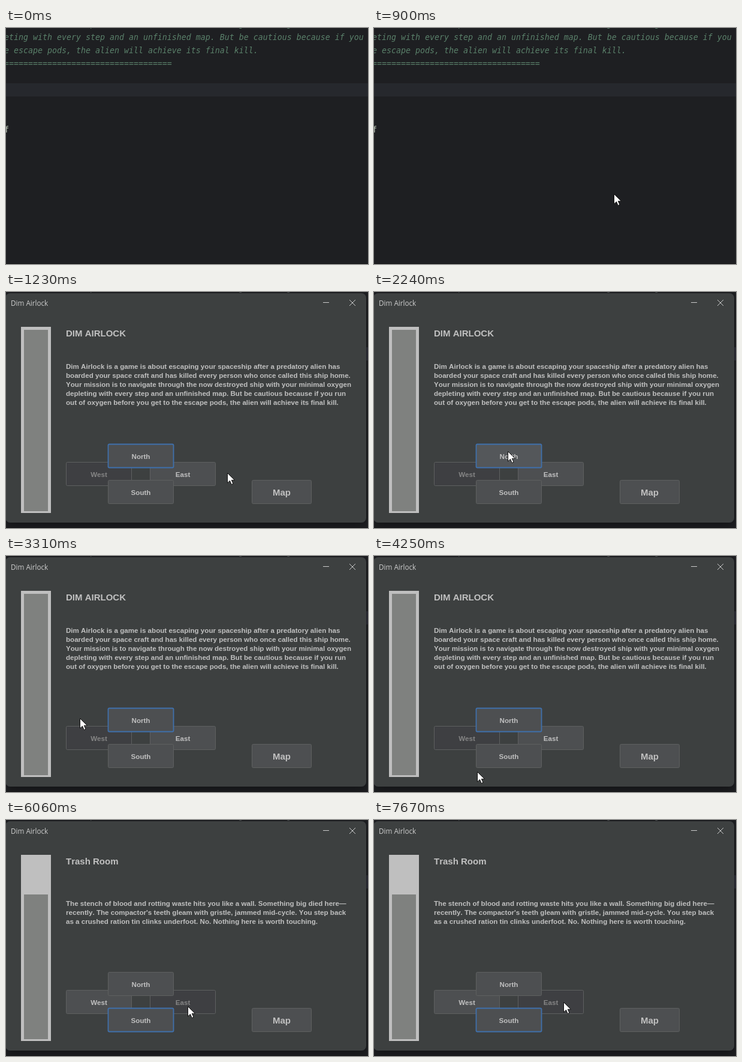
An HTML page that plays this animation: 604 px wide and 393 px high, repeating every 8 s.

```html
<!DOCTYPE html>
<html lang="en">
<head>
<meta charset="utf-8">
<title>Dim Airlock</title>
<style>
html, body { margin: 0; width: 100%; height: 100%; overflow: hidden; background: #1e1f22; }
svg { display: block; width: 604px; height: 393px; }
text { white-space: pre; font-kerning: none; }
#editor { font: 13.29px "DejaVu Sans Mono", monospace; }
#comment { fill: #5a806a; font-style: italic; }
#caret { fill: #26282d; }
.dim #comment { fill: #5c6062; }
.dim #caret { fill: #2e2e38; }
#app { font: bold 11.6px "Liberation Sans", Arial, sans-serif; fill: #c0c0c0; }
#app .title { font: 11.7px "Open Sans", sans-serif; fill: #ccc; }
#app .big { font-size: 15px; }
.icon { fill: none; stroke: #ccc; }
.btn text { text-anchor: middle; }
.btn rect { fill: #4d4f51; stroke: #5e6060; }
.btn.off rect { fill: #3e3f42; }
.btn.off text { fill: #858585; }
.btn.hover rect { fill: #54575a; stroke: #466d94; }
.btn.press rect { fill: #5c5f62; }
.btn.focus rect { stroke: #3f70ac; stroke-width: 1.8; }
</style>
</head>
<body>
<svg viewBox="0 0 604 393">
  <defs>
    <filter id="shadow" x="-10%" y="-10%" width="120%" height="120%">
      <feDropShadow dx="0" dy="4" stdDeviation="9" flood-opacity=".45"/>
    </filter>
  </defs>
  <g id="editor">
    <rect width="604" height="393" fill="#1e1f22"/>
    <rect id="caret" y="92" width="604" height="22"/>
    <rect y="392" width="604" height="1" fill="#151618"/>
    <g id="comment"></g>
    <text x="-3" y="174" fill="#bcc8b8">f</text>
  </g>
  <g id="app">
    <rect x="-1" y="2" width="602" height="382" rx="8" fill="#3c3f41" filter="url(#shadow)"/>
    <text class="title" x="8" y="23">Dim Airlock</text>
    <path class="icon" d="M529 17.5h10M573 13l10 10m0-10l-10 10"/>
    <rect x="25" y="58" width="50" height="310" fill="#bfbfbf"/>
    <rect id="oxygen" x="30" width="40" fill="#7f817f"/>
    <text id="heading" class="big" x="100" y="74"></text>
    <g id="story"></g>
    <g id="buttons"></g>
  </g>
  <path id="cursor" d="M.5.5v16.500l4-3.700 2.700 6.200 2.800-1.200-2.700-6h5.200z" fill="#fff" stroke="#111"/>
</svg>
<script>
const LOOP = 8000, OPEN = 905, PRESS = 5990, MOVE = 6060;
const $ = id => document.getElementById(id);
const textLines = (lines, x, y, step) =>
  lines.map((s, i) => `<text x="${x}" y="${y + step * i}">${s}</text>`).join('');

$('comment').innerHTML = textLines([
  'ce called this ship home. Your mission is to navigate through the now destroyed',
  'eting with every step and an unfinished map. But be cautious because if you',
  'e escape pods, the alien will achieve its final kill.',
  '='.repeat(35)
], -3, -2, 22);

const rooms = [
  { name: 'DIM AIRLOCK', top: 128, level: 63, off: 'West', focus: 'North', lines: [
    'Dim Airlock is a game is about escaping your spaceship after a predatory alien has',
    'boarded your space craft and has killed every person who once called this ship home.',
    'Your mission is to navigate through the now destroyed ship with your minimal oxygen',
    'depleting with every step and an unfinished map. But be cautious because if you run',
    'out of oxygen before you get to the escape pods, the alien will achieve its final kill.'] },
  { name: 'Trash Room', top: 143, level: 124, off: 'East', focus: 'South', lines: [
    'The stench of blood and rotting waste hits you like a wall. Something big died here—',
    "recently. The compactor's teeth gleam with gristle, jammed mid-cycle. You step back",
    'as a crushed ration tin clinks underfoot. No. Nothing here is worth touching.'] }
];

// Buttons from back to front; the four directions form a cross
const button = (name, x, y, w = 110) => ({ name, x: x - w / 2, y: y - 20, w });
const direction = (name, dx, dy) => button(name, 225 + 70 * dx, 303 + 30 * dy);
const buttons = [
  direction('West', -1, 0), direction('East', 1, 0),
  direction('North', 0, -1), direction('South', 0, 1),
  button('Map', 460, 333, 100)
];
$('buttons').innerHTML = buttons.map(({ name, x, y, w }) => {
  const big = name === 'Map';
  return `<g class="btn" id="${name}">
    <rect x="${x + .5}" y="${y + .5}" width="${w - 1}" height="39" rx="2"/>
    <text class="${big ? 'big' : ''}" x="${x + w / 2}" y="${y + (big ? 26 : 25)}">${name}</text></g>`;
}).join('');

// Pointer strokes: start, end, target, and how far it circles on the way
const strokes = [
  { t: 440, end: 960, x: 397, y: 287 },
  { t: 970, end: 1300, x: 366, y: 303 },
  { t: 1440, end: 1840, x: 226, y: 293 },
  { t: 1980, end: 2240, x: 223, y: 265 },
  { t: 2300, end: 2570, x: 228, y: 277 },
  { t: 2780, end: 3580, x: 228, y: 231, rx: 105, ry: 50 },
  { t: 3590, end: 3920, x: 391, y: 300 },
  { t: 3920, end: 4250, x: 172, y: 359 },
  { t: 4250, end: 4450, x: 110, y: 280 },
  { t: 4460, end: 4930, x: 400, y: 205 },
  { t: 4930, end: 5320, x: 308, y: 320 },
  { t: 5340, end: 5650, x: 303, y: 310 },
  { t: 6610, end: 7470, x: 345, y: 304, rx: 85, ry: 70 },
  { t: 7500, end: 7660, x: 316, y: 303 }
];

function pointer(now) {
  let x = 470, y = -20;
  for (const s of strokes) {
    if (now < s.t) break;
    const p = Math.min(1, (now - s.t) / (s.end - s.t));
    const k = p * p * (3 - 2 * p);
    x += (s.x - x) * k + (s.rx || 0) * Math.sin(2 * Math.PI * k);
    y += (s.y - y) * k + (s.ry || 0) * Math.sin(Math.PI * k) ** 2;
  }
  return [Math.round(x), Math.round(y)];
}

let shown;
function enter(room) {
  if (room === shown) return;
  shown = room;
  $('heading').textContent = room.name;
  $('story').innerHTML = textLines(room.lines, 100, room.top, 15);
  $('oxygen').setAttribute('y', room.level);
  $('oxygen').setAttribute('height', 365 - room.level);
}

function draw(t) {
  const room = rooms[t < MOVE ? 0 : 1], pressed = t >= PRESS && t < MOVE;
  enter(room);

  const p = Math.min(1, Math.max(0, (t - OPEN) / 250));
  const shrink = .1 * (1 - p) ** 3;
  $('app').setAttribute('transform', `translate(${232 * shrink} ${145 * shrink}) scale(${1 - shrink})`);
  $('app').setAttribute('opacity', Math.min(1, p * 4));
  $('editor').classList.toggle('dim', p > 0);

  const [x, y] = pointer(t);
  $('cursor').setAttribute('transform', `translate(${x} ${y})`);
  const over = buttons.findLast(b => x >= b.x && x < b.x + b.w && y >= b.y && y < b.y + 40);
  const focus = pressed ? 'East' : room.focus;
  for (const b of buttons) {
    const list = $(b.name).classList, off = b.name === room.off;
    list.toggle('off', off);
    list.toggle('hover', b === over && !off);
    list.toggle('press', b === over && pressed);
    list.toggle('focus', b.name === focus);
  }
}

const start = performance.now();
function tick() {
  draw((performance.now() - start) % LOOP);
  requestAnimationFrame(tick);
}
tick();
</script>
</body>
</html>
```
